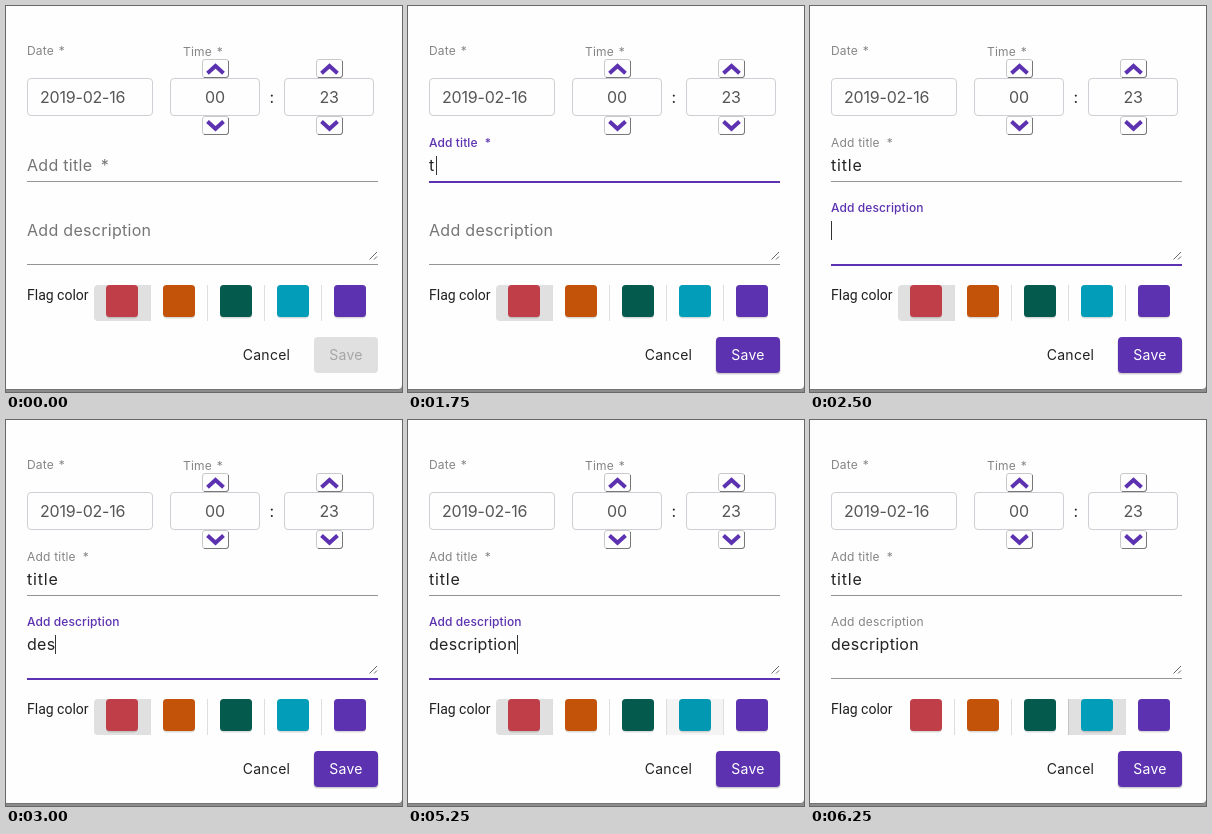
Recreate the animation shown at these times as an HTML page. Size 396 px wide and 386 px high, loop 7.25 s.

```html
<!DOCTYPE html>
<html lang="en">
<head>
<meta charset="utf-8">
<title>Event form</title>
<style>
html, body { margin: 0; width: 100%; height: 100%; overflow: hidden; background: #8c8c8c; }
svg { display: block; width: 396px; height: 386px; }
text { font: 16px Inter, "Open Sans", sans-serif; letter-spacing: .3px; white-space: pre; }
.small { font-size: 12px; letter-spacing: .2px; fill: #858585; }
.big { fill: #757575; }
.active { fill: #5c32b0; font-weight: 500; letter-spacing: .1px; }
.value { fill: #232323; }
.num { fill: #565656; letter-spacing: -.2px; }
.btn { font-size: 14px; letter-spacing: .25px; }
.flag { font: 14px Roboto, sans-serif; letter-spacing: 0; fill: #202020; }
.mid { text-anchor: middle; }
.end { text-anchor: end; }
</style>
</head>
<body>
<svg id="stage" viewBox="0 0 396 386"></svg>
<script>
const LOOP = 7250;
const PURPLE = '#5c32b0';
const COLORS = ['#c03e48', '#c25309', '#045a4d', '#029db8', PURPLE];

// time, typed text, caret x
const TITLE = [[1000, '', 21.5], [1750, 't', 28.5], [2000, 'tit', 40.5], [2250, 'title', 54.5]];
const DESC = [
  [2500, '', 21.5], [2750, 'de', 40.5], [3000, 'des', 49.5], [3250, 'desc', 58.5],
  [3500, 'descri', 69.5], [3750, 'descript', 85.5], [4000, 'description', 109.5]
];

const stage = document.getElementById('stage');

const rect = (x, y, w, h, r, fill, extra = '') =>
  `<rect x="${x}" y="${y}" width="${w}" height="${h}" rx="${r}" fill="${fill}" ${extra}/>`;
const line = (d, color, width = 1) =>
  `<path d="${d}" fill="none" stroke="${color}" stroke-width="${width}"/>`;
const text = (x, y, cls, str, extra = '') =>
  `<text x="${x}" y="${y}" class="${cls}" ${extra}>${str}</text>`;
const label = (x, y, cls, str, starEnd) =>
  text(x, y, cls, str) + (starEnd ? text(starEnd, y, cls + ' end', '*') : '');
const box = (x, w) => rect(x + .5, 72.5, w - 1, 37, 3.5, '#fefefe', 'stroke="#cfced4"');

function spinner(cx) {
  const button = y =>
    rect(cx - 12.5, y, 26, 18, 2.5, '#fefefe', 'stroke="#c9c9c9"') +
    line(`M${cx + 13.5} ${y + 1.5}v14q0 2.5-2.5 2.5h-22`, '#777');
  return button(53.5) + button(110.5) +
    line(`M${cx - 7.5} 67.2L${cx + .5} 60L${cx + 8.5} 67.2M${cx - 7.5} 115.6L${cx + .5} 122.8L${cx + 8.5} 115.6`, PURPLE, 4);
}

function field(steps, t, blurAt, name, y, starBig, starSmall) {
  const step = steps.filter(s => s[0] <= t).pop();
  const focus = step && t < blurAt;
  const lineY = y + (starBig ? 10 : 28);
  let out = step
    ? label(21, y - 24, focus ? 'small active' : 'small', name, starSmall)
    : label(21, y, 'big', name, starBig);
  if (step) out += text(21, y, 'value', step[1], starBig ? 'style="letter-spacing:.8px"' : '');
  out += focus
    ? rect(21, lineY, 351, 2, 0, PURPLE)
    : rect(21, lineY, 351, 1, 0, '#949494');
  const blink = t >= 4750 && t < 5250;
  if (focus && !blink) out += line(`M${step[2]} ${y - 15}v19`, '#333');
  return out;
}

function palette(t) {
  const picked = t < 5750 ? 0 : 3;
  const hover = t >= 5250 && t < 5750;
  let out = '';
  if (hover) out += rect(259, 279, 57, 36, 0, '#f4f4f4');
  out += picked
    ? rect(258, 279, 58, 36, 0, '#e0e0e0')
    : `<path d="M145 279H92q-4 0-4 4v28q0 4 4 4h53z" fill="#e0e0e0"/>`;
  COLORS.forEach((color, i) => {
    const x = 100 + 57 * i;
    if (i) out += line(`M${x - 12.5} 279v36`, picked && i === 3 ? '#c4c4c4' : '#dedede');
    out += rect(x, 280.5, 32, 32, 4, '#000', 'opacity=".14"');
    out += rect(x, 279, 32, 32, 3.5, hover && i === 3 ? '#0398b2' : color);
  });
  return out;
}

function saveButton(t) {
  const on = t >= 1750;
  return (on ? rect(307.5, 332.5, 65, 36, 4, '#000', 'opacity=".18"') : '') +
    rect(308, 331, 64, 36, 4, on ? PURPLE : '#e0e0e0') +
    text(340, 354, 'btn mid', 'Save', `fill="${on ? '#fff' : '#a5a5a5'}"`);
}

const base =
  rect(0, 0, 396, 386, 0, '#8c8c8c') +
  rect(-6, -6, 402, 390, 5, '#757575') +
  rect(-6, -6, 402, 389, 4, '#fefefe') +
  label(21, 49, 'small', 'Date', 59) +
  label(177, 50, 'small', 'Time', 217) +
  spinner(209) + spinner(323) +
  box(21, 126) + box(164, 90) + box(278, 90) +
  text(34, 96.5, 'num', '2019-02-16') +
  text(209, 96.5, 'num mid', '00') +
  text(323, 96.5, 'num mid', '23') +
  text(266, 97, 'value mid', ':') +
  line('M363.5 253.5l7.5-7.5M368 253.5l3-3', '#666') +
  text(21, 294, 'flag', 'Flag color') +
  text(260.5, 354, 'btn value mid', 'Cancel');

function draw(t) {
  return base +
    field(TITLE, t, 2500, 'Add title', 165, 103, 83) +
    field(DESC, t, 5750, 'Add description', 230) +
    palette(t) + saveButton(t);
}

let shown = '';
function frame() {
  const next = draw(performance.now() % LOOP);
  if (next !== shown) stage.innerHTML = shown = next;
  requestAnimationFrame(frame);
}
frame();
</script>
</body>
</html>
```
